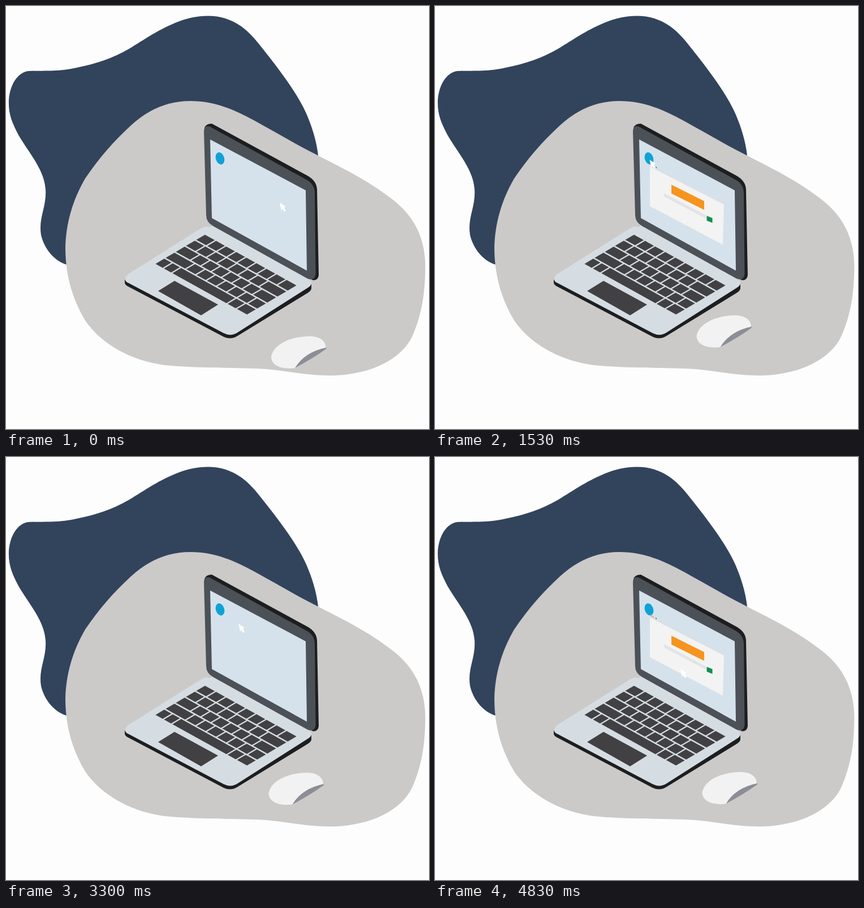
Recreate the animation shown at these times as an HTML page. Size 748 by 748 pixels, loop 5.43 s.

```html
<!DOCTYPE html>
<html lang="en">
<head>
<meta charset="utf-8">
<title>Laptop and mouse</title>
<style>
html, body { margin: 0; width: 100%; height: 100%; overflow: hidden; background: #fdfdfd; }
svg { display: block; width: 100%; height: 100%; }
</style>
</head>
<body>
<svg viewBox="0 0 748 748">
  <path fill="#32435c" d="M40 115C75 114 95 116 125 109C160 102 189 92 217 76C251 55 270 42 300 29.5C330 17 362 14 388 22C424 34 440 58 463 87C491 123 516 157 531 190C544 220 550 245 552 265L300 400L106 457C85 450 68 430 62 405C57 375 72 355 70 325C68 290 42 262 22 228C10 205 4 190 5 166C7 140 20 117 40 115Z"/>
  <path fill="#cbcac9" d="M326 168C370 168 405 184 440 203C480 225 515 246 551 264C600 289 640 309 678 338C713 363 741 400 741.5 460C741 500 738 540 718 585C700 622 650 652 575 653.5C530 653 495 645 460 642C410 639 340 641 280 635C225 628 170 600 140 556C115 515 105 470 105 428C106 385 117 345 140 305C165 268 190 240 220 212C250 184 285 168 326 168Z"/>

  <!-- base -->
  <path fill="#1c1e20" d="M210 484L540 488L540 499Q540 503 534 507L410 583Q398 591 385 585L216 496Q210 493 210 489Z"/>
  <path fill="#d5dde2" d="M211 483Q211 478 216 474L345 393Q352 388 361 391L366 387L532 481L540 488Q541 494 534 498L410 577Q398 585 385 578.5L217 490Q210 487 211 483Z"/>
  <g id="keys" fill="#414144" transform="matrix(164 91 -90 53 352 403)"/>
  <path fill="#414144" d="M298 486L375 528L345 547L269 504Z"/>

  <!-- screen -->
  <path fill="#1c1e20" d="M351 216Q353 208 364 208L533 300Q549 309 550 324L553 476Q552 485 543 485L360 380Z"/>
  <path fill="#4b5157" d="M350 222Q350 210 360 213L531 307Q546 315 546 331L547.5 474Q546 487 533 482L366 389Q354 382 354 370Z"/>
  <path fill="#d5e2eb" d="M361 236L530 326L532 468L364 375Z"/>
  <ellipse cx="378.5" cy="269.5" rx="7.5" ry="11" fill="#10a2d6" transform="rotate(-18 378.5 269.5)"/>

  <g id="win">
    <path fill="#f3f3f3" d="M380 283L511 350L509 422L380 354Z"/>
    <path fill="#dcdfe3" d="M380 281L511 348V351L380 284Z"/>
    <path fill="#e4e4e7" d="M405 331L479 370V376L405 337Z"/>
    <path fill="#f7941d" d="M418 316L476 345V360.5L418 331.5Z"/>
    <path fill="#0f9150" d="M480.5 371L490.5 375V383.5L480.5 379.5Z"/>
  </g>
  <g id="marks">
    <path fill="#f0a060" d="M381 279L387 282V284L381 281Z"/>
    <path fill="#0f9150" d="M390 284L392 285V287L390 286Z"/>
  </g>
  <path id="cursor" fill="#fff" d="M0 0L11 7L7.5 8.5L11 14L8 16L5 10.5L3 14Z"/>

  <g id="mouse">
    <path fill="#8d8d97" d="M511 640Q526 612 566 602L566.5 606Q543 623 511 640Z"/>
    <path fill="#f2f2f2" d="M469 621C472 600 500 585 535 584C555 584 564 591 566 604Q528 612 511 640C495 643 470 639 469 621Z"/>
  </g>
</svg>
<script>
const el = id => document.getElementById(id);

// Key widths per row, back row first
const rows = [
  [1.1, 1, 1, 1, 1, 1, 1, 1, 1.1],
  [1, 1, 1, 1, 1, 1, 1, 1.8],
  [1.5, 1, 1, 1, 1, 1, 1, 1.5],
  [2, 1, 1, 1, 1, 1, 1, 1],
  [.9, .9, 5.9, 1, 1.2]
];
el('keys').innerHTML = rows.map((row, r) => {
  const total = row.reduce((a, b) => a + b);
  let x = 0;
  return row.map(w => {
    const rect = `<rect x="${x / total + .007}" y="${r / 5 + .014}" width="${w / total - .014}" height=".172"/>`;
    x += w;
    return rect;
  }).join('');
}).join('');

const LOOP = 5430, SECOND = 2730;
const progress = (t, from, to) => Math.min(1, Math.max(0, (t - from) / (to - from)));
const smooth = u => u * u * (3 - 2 * u);
const easeOut = u => 1 - (1 - u) ** 3;

// Piecewise blend through three points
const along = ([a, b, c], p, q) => a.map((v, i) => v + (b[i] - v) * p + (c[i] - b[i]) * q);
const cursorStops = [[484, 348], [379.5, 272], [434, 375]];
const mouseStops = [[0, 0], [-6.5, -37], [3.5, -27]];
const place = (id, pos) => el(id).setAttribute('transform', `translate(${pos})`);

function draw(now) {
  const loop = now % LOOP;
  const t = loop < SECOND ? loop : loop - SECOND;
  const reach = smooth(progress(t, 0, 900));
  const leave = smooth(progress(t, 1567, 2100));
  const open = easeOut(progress(t, 920, 1567));
  place('cursor', along(cursorStops, reach, leave));
  place('mouse', along(mouseStops, reach, leave));
  el('win').setAttribute('transform', `translate(380 277) scale(${open}) translate(-380 -277)`);
  el('win').style.display = open ? '' : 'none';
  el('marks').style.display = open > .95 ? '' : 'none';
}

const start = performance.now();
function tick() {
  draw(performance.now() - start);
  requestAnimationFrame(tick);
}
tick();
</script>
</body>
</html>
```
